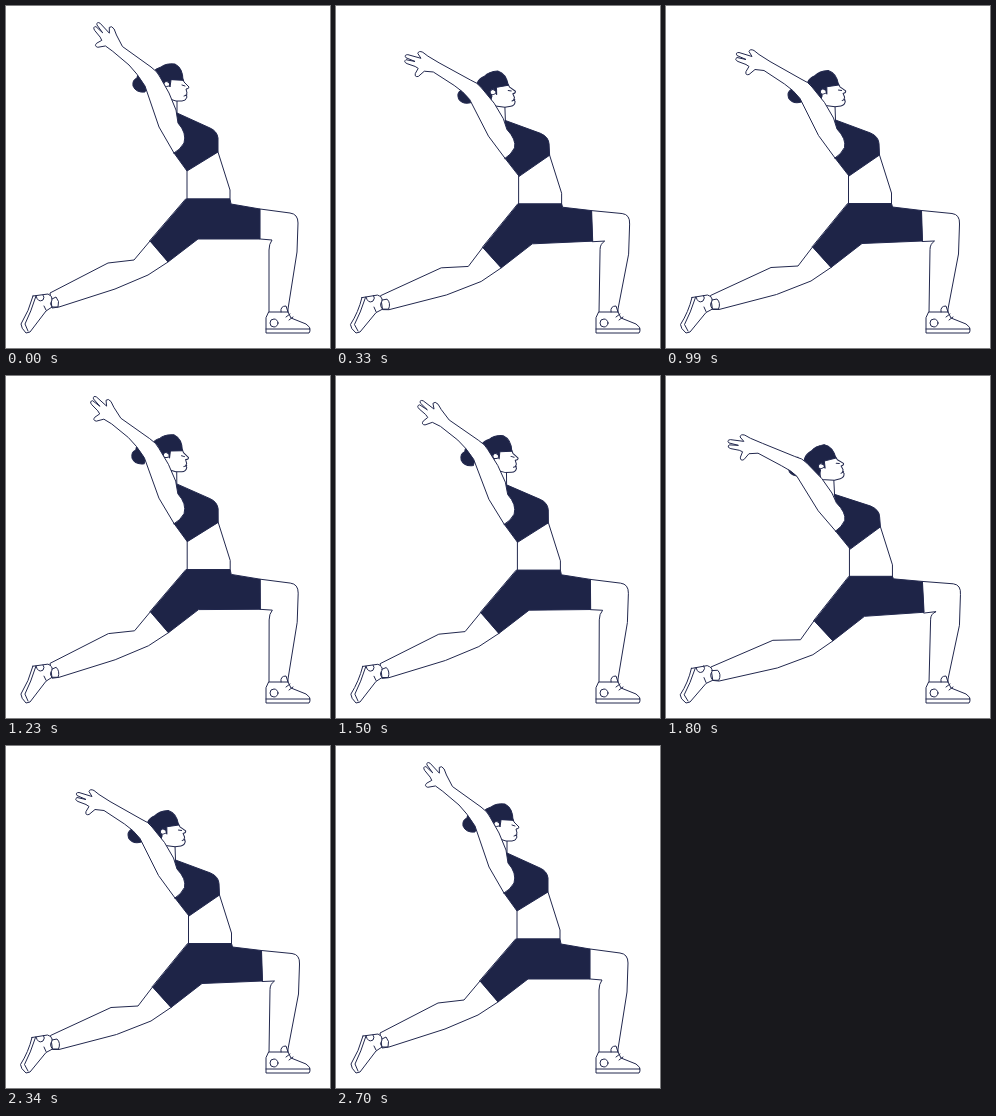
Recreate the animation shown at these times as an HTML page. Size 324 by 342 pixels, loop 2.73 s.

```html
<!DOCTYPE html>
<html lang="en">
<head>
<meta charset="utf-8">
<title>Lunge stretch</title>
<style>
html, body { margin: 0; width: 100%; height: 100%; overflow: hidden; background: #fff; }
svg { display: block; width: 100vw; height: 100vh; }
path, circle { stroke: #22284e; stroke-width: 1; stroke-linejoin: round; stroke-linecap: round; fill: #fff; }
.dark { fill: #1e2447; }
.line { fill: none; }
</style>
</head>
<body>
<svg id="stage" viewBox="0 0 324 342"></svg>
<script>
const LOOP = 2730, STEP = 30, CYCLE = 1350, DOWN = 630;
const stage = document.getElementById('stage');
const NUM = /-?\d+(\.\d+)?/g;

function add(tag, attrs, parent = stage) {
  const el = document.createElementNS('http://www.w3.org/2000/svg', tag);
  for (const k in attrs) el.setAttribute(k, attrs[k]);
  parent.appendChild(el);
  return el;
}

const mix = (a, b, q) => a + (b - a) * q;

// Blend two path strings that share one structure.
function blend(up, low, q) {
  const to = low.match(NUM);
  let i = 0;
  return up.replace(NUM, n => mix(+n, +to[i++], q).toFixed(2));
}

const morphs = [];
function morph(cls, up, low) {
  morphs.push({ el: add('path', { class: cls }), up, low });
}

// Head, drawn around the middle of the forehead
const bun = add('path', { class: 'dark', d: 'M5 -9Q-3 -11 -3 -5Q-8 -3 -7 3Q-4 10 5 9Q9 0 5 -9Z' });
morph('', 'M160 92L171 94L171 107L171 117L162 110Z', 'M153 103L167 105L168 121L170 130L158 120Z');
const head = add('g', {});
add('path', { d: 'M0 0L1 3L6 8Q6 10 3 10L4 14L3 16L4 18Q3 22 -1 22L-7 22L-20 18L-18 0Z' }, head);
add('path', { class: 'dark', d: 'M0 1Q0 -11 -8 -15Q-17 -16 -22 -12Q-33 -9 -32 2Q-31 12 -22 16L-18 9Q-20 2 -15 2L-13 8L-12 1Z' }, head);
add('path', { d: 'M-14 7Q-20 9 -19 4Q-17 1 -14 4' }, head);
add('path', { class: 'line', d: 'M-1 6L2 7M1 17L4 16' }, head);

// Torso and top
morph('', 'M181 163L181 193L224 193L224 184L212 146Z', 'M184 173L184 203L227 203L227 190L215 152Z');
morph('dark', 'M171 107L204 122Q211 125 212 132L212 146L181 165L168 147L171 117Z',
  'M168 121L205 132Q214 136 214 143L215 152L185 175L170 157L170 129Z');

// Back leg and shoe
morph('', 'M144 235L128 254L102 257L44 287L46 302L53 301L109 283L142 269L162 256Z',
  'M149 247L136 266L108 266L45 292L47 305L53 306L112 294L148 281L168 267Z');
morph('', 'M27 290L42 288Q47 290 46 294Q43 298 46 301L40 305L24 326L20 327Q15 322 15 318Q23 305 27 290Z',
  'M25 293L41 290Q47 292 46 296Q43 300 47 305L40 308L24 326L20 327Q14 323 14 319Q22 307 25 293Z');
morph('line', 'M30 290Q25 306 19 318L22 325M30 290Q32 297 37 294Q39 291 37 289M40 304L38 300M46 301L52 301Q54 295 50 291L46 293',
  'M29 293Q24 308 18 319L22 325M30 292Q32 299 37 296Q40 293 38 290M40 307L38 302M47 305L53 305Q56 299 52 295L46 295');

// Front leg, shorts and shoe
morph('', 'M254 203L284 207Q292 208 292 217L291 246L282 303L282 307L263 307L263 244Q263 238 266 234L254 233Z',
  'M257 206L288 208Q296 209 295 219L294 250L282 303L282 307L263 307L265 243Q265 238 271 236L259 238Z');
morph('dark', 'M180 193L224 193L225 198L254 203L254 233L192 233L162 256L144 235Z',
  'M184 202L227 202L228 204L257 206L259 237L200 242L168 267L149 247Z');
add('path', { d: 'M263 306L282 306L285 312L300 318Q305 321 304 325L303 327L260 327L260 312Z' });
add('path', { class: 'line', d: 'M260 323L304 323M275 306Q274 300 280 300L282 306M280 311L284 308M283 314L287 311' });
add('circle', { cx: 268, cy: 317, r: 4 });

// Arm with a turning hand
const arm = add('path', {});
const HAND = 'M-2 5L-11 4L-17 9Q-21 10 -20 6L-17 1L-20 -1L-28 -4Q-32 -6 -29 -8L-20 -6L-29 -10Q-31 -13 -27 -13L-14 -9L-17 -14Q-16 -17 -12 -15L-7 -11L4 -4';
const ARM_UP = 'M168 147L153 121L139 80Q131 67 123 59';
const ARM_LOW = 'M170 157L152 138L129 105Q124 101 114 97';
const ARM2_UP = 'L145 61Q152 66 154 71L163 87L170 104L172 117Q181 127 178 137Q174 144 168 147Z';
const ARM2_LOW = 'L125 85Q133 86 138 91L154 106L165 120L170 129Q180 139 179 146Q176 153 170 157Z';

function turn(path, x, y, deg) {
  const c = Math.cos(deg * Math.PI / 180), s = Math.sin(deg * Math.PI / 180);
  return path.replace(/(-?\d+) (-?\d+)/g, (m, a, b) =>
    (x + a * c - b * s).toFixed(2) + ' ' + (y + a * s + b * c).toFixed(2));
}

// 0 = arms raised, 1 = lowest point of the stretch
function depth(t) {
  const u = t % CYCLE;
  const k = u < DOWN ? u / DOWN : (CYCLE - u) / (CYCLE - DOWN);
  return (1 - Math.cos(Math.PI * k)) / 2;
}

function draw(t) {
  const q = depth(t);
  for (const m of morphs) m.el.setAttribute('d', blend(m.up, m.low, q));
  head.setAttribute('transform', `translate(${mix(177, 168, q)} ${mix(73, 83, q)}) rotate(${-18 * q})`);
  bun.setAttribute('transform',
    `translate(${134 - 17 * q + 14 * q * q} ${77 + 29 * q - 14 * q * q}) rotate(${-18 * q})`);
  const swing = 30 - 78 * q + 36 * q * q;
  const hand = turn(HAND, mix(111, 89, q), mix(42, 80, q) - 6 * q * (1 - q), swing);
  arm.setAttribute('d', blend(ARM_UP, ARM_LOW, q) + hand.replace('M', 'L') + blend(ARM2_UP, ARM2_LOW, q));
}

const start = performance.now();
function tick(now) {
  const t = Math.max(0, now - start) % LOOP;
  draw(Math.floor(t / STEP) * STEP);
  requestAnimationFrame(tick);
}
draw(0);
requestAnimationFrame(tick);
</script>
</body>
</html>
```
